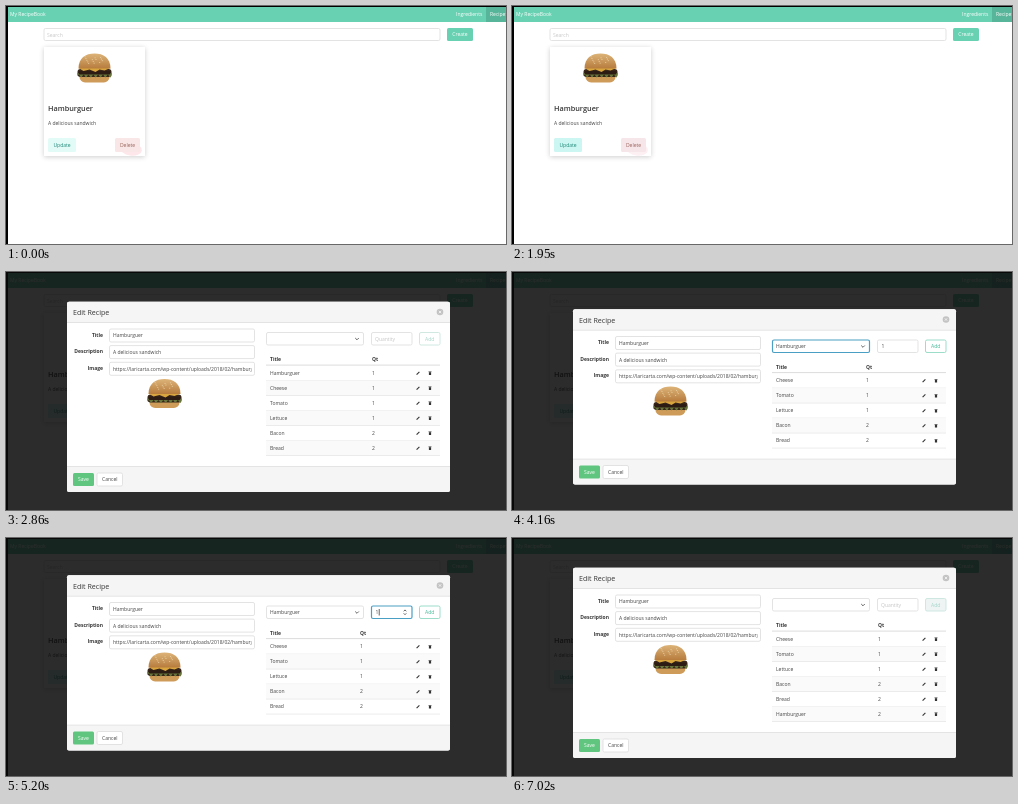
Animation, 500 px wide and 238 px high, one loop 8 s. Source, as an HTML page with a canvas:

```html
<!DOCTYPE html>
<html lang="en">
<head>
<meta charset="utf-8">
<title>Recipe editor</title>
<style>
html, body { margin: 0; width: 100%; height: 100%; overflow: hidden; background: #fff; }
canvas { display: block; width: 500px; height: 238px; }
</style>
</head>
<body>
<canvas id="stage"></canvas>
<script>
const LOOP = 8000;
const FONT = '"Open Sans", "Noto Sans", sans-serif';
const TEAL = '#68d1b2', LINE = '#dcdcdc', INK = '#444', FOCUS = '#4a9fc4';

const canvas = document.getElementById('stage');
const ctx = canvas.getContext('2d');
const ratio = window.devicePixelRatio || 1;
canvas.width = 500 * ratio;
canvas.height = 238 * ratio;
ctx.scale(ratio, ratio);

const started = [
  ['Cheese', 1], ['Tomato', 1], ['Lettuce', 1], ['Bacon', 2], ['Bread', 2]
];
const before = [['Hamburguer', 1], ...started];
const after = [...started, ['Hamburguer', 2]];

// Each entry holds from its time until the next one.
const editing = { rows: started, choice: 'Hamburguer' };
const steps = [
  { at: 0 },
  { at: 1430, hover: true },
  { at: 2080, modal: { rows: before } },
  { at: 4160, modal: { ...editing, qty: '1', focus: 'select' } },
  { at: 4680, modal: { ...editing, qty: '1', focus: 'qty' } },
  { at: 5200, modal: { ...editing, qty: '1', focus: 'qty', caret: true } },
  { at: 5590, modal: { ...editing, qty: '', focus: 'qty', caret: true } },
  { at: 5720, modal: { ...editing, qty: '2', focus: 'qty', caret: true } },
  { at: 5980, modal: { ...editing, qty: '2', focus: 'qty' } },
  { at: 6500, modal: { ...editing, qty: '2', hover: true } },
  { at: 7020, modal: { rows: after, hover: true } }
];

function rect(x, y, w, h, fill) {
  ctx.fillStyle = fill;
  ctx.fillRect(x, y, w, h);
}

function box(x, y, w, h, fill, stroke, r = 1.5, weight = 0.8) {
  ctx.beginPath();
  ctx.roundRect(x, y, w, h, r);
  if (fill) { ctx.fillStyle = fill; ctx.fill(); }
  if (stroke) { ctx.strokeStyle = stroke; ctx.lineWidth = weight; ctx.stroke(); }
}

function text(str, x, y, { size = 5, color = INK, weight = 400, align = 'left' } = {}) {
  ctx.font = `${weight} ${size}px ${FONT}`;
  ctx.textAlign = align;
  ctx.fillStyle = color;
  ctx.fillText(str, x, y);
}

function line(points, color, weight) {
  ctx.beginPath();
  points.forEach(([x, y], i) => i ? ctx.lineTo(x, y) : ctx.moveTo(x, y));
  ctx.strokeStyle = color;
  ctx.lineWidth = weight;
  ctx.stroke();
}

function button(label, x, y, w, h, fill, color, stroke) {
  box(x, y, w, h, fill, stroke);
  text(label, x + w / 2, y + h / 2 + 1.9, { color, align: 'center' });
}

function burger(cx, cy) {
  ctx.save();
  ctx.translate(cx, cy);
  box(-15, 7, 30, 7.5, '#cf9b58', null, [2, 2, 6, 6]);
  box(-17, 1, 34, 8, '#39261a', null, 3);

  // Wavy lettuce under the patty
  ctx.beginPath();
  ctx.moveTo(-17, 5);
  for (let x = -17; x <= 17; x++) ctx.lineTo(x, 8 + Math.sin(x * 1.3) * 1.6);
  ctx.lineTo(17, 5);
  ctx.fillStyle = '#67763b';
  ctx.fill();

  box(-16, 3, 32, 3.5, '#2c1c14', null, 1.5);
  ctx.beginPath();
  ctx.moveTo(-16, 0);
  ctx.lineTo(16, 0);
  ctx.lineTo(10, 2.5);
  ctx.lineTo(5, 1.5);
  ctx.lineTo(1, 4);
  ctx.lineTo(-5, 1.5);
  ctx.lineTo(-11, 3);
  ctx.fillStyle = '#d9a53e';
  ctx.fill();

  ctx.beginPath();
  ctx.moveTo(-16, 0.5);
  ctx.bezierCurveTo(-16, -10, -9, -14.5, 0, -14.5);
  ctx.bezierCurveTo(9, -14.5, 16, -10, 16, 0.5);
  ctx.closePath();
  const bun = ctx.createLinearGradient(0, -14, 0, 1);
  bun.addColorStop(0, '#dcb277');
  bun.addColorStop(1, '#b57a3b');
  ctx.fillStyle = bun;
  ctx.fill();
  for (let i = 0; i < 14; i++) {
    rect(-10 + (i * 7.3) % 21, -11.5 + (i * 2.9) % 7, 1.1, 0.7, '#f0d9ad');
  }
  ctx.restore();
}

function page(hover) {
  rect(0, 0, 500, 238, '#fff');
  rect(0, 1, 500, 15, TEAL);
  rect(480, 1, 20, 15, '#57b599');
  text('My RecipeBook', 4, 9.8, { color: '#fff' });
  text('Ingredients', 450, 9.8, { color: '#fff' });
  text('Recipes', 484, 9.8, { color: '#fff' });

  box(38, 22.5, 396, 12, '#fff', LINE);
  text('Search', 41, 30.7, { color: '#c8c8c8' });
  button('Create', 441, 22, 26, 13, TEAL, '#fff');

  ctx.save();
  ctx.shadowColor = 'rgba(10,10,10,.2)';
  ctx.shadowBlur = 5 * ratio;
  ctx.shadowOffsetY = ratio;
  rect(38, 41, 101, 109, '#fff');
  ctx.restore();
  burger(88.5, 62);
  text('Hamburguer', 42, 105, { size: 7.3, weight: 600, color: '#363636' });
  text('A delicious sandwich', 42, 119.2);

  ctx.beginPath();
  ctx.ellipse(125, 143, 11, 6.5, 0.15, 0, Math.PI * 2);
  ctx.fillStyle = hover ? '#fdf0f3' : '#fde7ea';
  ctx.fill();
  button('Update', 42, 132, 28, 14, hover ? '#cbf6f1' : '#e3fbf6', '#1f8878');
  button('Delete', 109, 132, 25, 14, hover ? '#f6e6ea' : '#f8e7e6', '#99635c');

  rect(0, 0, 2, 238, '#000');
  rect(0, 0, 500, 1, '#000');
}

function pencil(x, y) {
  line([[x - 1.4, y + 1.4], [x + 1.4, y - 1.4]], '#333', 1.1);
}

function trash(x, y) {
  rect(x - 1.1, y - 1, 2.2, 2.8, '#333');
  rect(x - 1.5, y - 1.7, 3, 0.6, '#333');
}

function field(label, value, y) {
  text(label, 97, y + 7.5, { weight: 700, color: '#363636', align: 'right' });
  box(103.5, y, 145, 13, '#fff', LINE);
  ctx.save();
  ctx.beginPath();
  ctx.rect(104, y, 141.5, 13);
  ctx.clip();
  text(value, 107, y + 8.4);
  ctx.restore();
}

function picker({ choice, qty, focus, caret, hover }) {
  const weight = name => focus === name ? 1.2 : 0.8;
  const edge = name => focus === name ? FOCUS : LINE;
  box(260.5, 60.5, 97, 12.5, '#fff', edge('select'), 1.5, weight('select'));
  if (choice) text(choice, 264, 68.8);
  line([[349.2, 66], [351, 67.8], [352.8, 66]], '#555', 0.9);

  box(365.5, 60.5, 40.5, 12.5, '#fff', edge('qty'), 1.5, weight('qty'));
  if (qty === undefined) text('Quantity', 369, 68.8, { color: '#c4c4c4' });
  else text(qty, 369.5, 68.8);
  if (caret) rect(qty ? 372.8 : 369.5, 63.5, 0.7, 6.5, '#222');
  if (focus === 'qty') {
    line([[397.7, 65.8], [399, 64.4], [400.3, 65.8]], '#555', 0.9);
    line([[397.7, 67.8], [399, 69.2], [400.3, 67.8]], '#555', 0.9);
  }

  const ready = choice !== undefined;
  button('Add', 413.5, 60.5, 20.5, 12.5, hover ? '#eef4f4' : '#fff',
    ready ? '#43b896' : '#a3d5c8', ready ? '#83d5bd' : '#c5e2da');
}

function table(rows, qtyX) {
  const head = { weight: 700, color: '#363636' };
  text('Title', 264, 89, head);
  text('Qt', qtyX, 89, head);
  rect(260, 92.6, 174, 1, LINE);
  rows.forEach(([name, qty], i) => {
    const y = 93.6 + i * 15;
    if (i % 2) rect(260, y, 174, 15, '#fafafa');
    rect(260, y + 14.6, 174, 0.7, '#e4e4e4');
    text(name, 264, y + 9.2);
    text(qty, qtyX, y + 9.2);
    pencil(412, y + 7.6);
    trash(424, y + 7.6);
  });
}

function dialog(state) {
  // The dialog stays centred, so one row less moves it by half a row.
  const shrink = (6 - state.rows.length) * 15;
  rect(0, 0, 500, 238, 'rgba(10,10,10,.86)');
  ctx.save();
  ctx.translate(0, shrink / 2);
  const bottom = 220 - shrink;
  box(61, 29.7, 383, bottom - 29.7, '#fff', null, 2);
  box(61, 29.7, 383, 21, '#f5f5f5', null, [2, 2, 0, 0]);
  rect(61, 50.3, 383, 0.7, LINE);
  text('Edit Recipe', 67, 43.2, { size: 7.1, color: '#363636' });
  ctx.beginPath();
  ctx.arc(434, 40, 3.3, 0, Math.PI * 2);
  ctx.fillStyle = '#c3c3c3';
  ctx.fill();
  line([[432.8, 38.8], [435.2, 41.2]], '#fff', 0.7);
  line([[435.2, 38.8], [432.8, 41.2]], '#fff', 0.7);

  field('Title', 'Hamburguer', 57);
  field('Description', 'A delicious sandwich', 73.6);
  field('Image', 'https://laricarta.com/wp-content/uploads/2018/02/hamburguesa.jpg', 90.3);
  burger(158.5, 121.5);
  picker(state);
  table(state.rows, state.choice ? 354 : 366);

  box(61, bottom - 25.5, 383, 25.5, '#f5f5f5', null, [0, 0, 2, 2]);
  rect(61, bottom - 25.8, 383, 0.7, LINE);
  button('Save', 67, bottom - 19, 21, 13, '#60c57f', '#fff');
  button('Cancel', 91, bottom - 19, 25.5, 13, '#fff', INK, LINE);
  ctx.restore();
}

function draw(now) {
  const t = now % LOOP;
  const step = steps.findLast(s => s.at <= t);
  page(step.hover || step.modal);
  if (step.modal) dialog(step.modal);
}

const origin = performance.now();
function tick() {
  draw(performance.now() - origin);
  requestAnimationFrame(tick);
}
tick();
</script>
</body>
</html>
```
